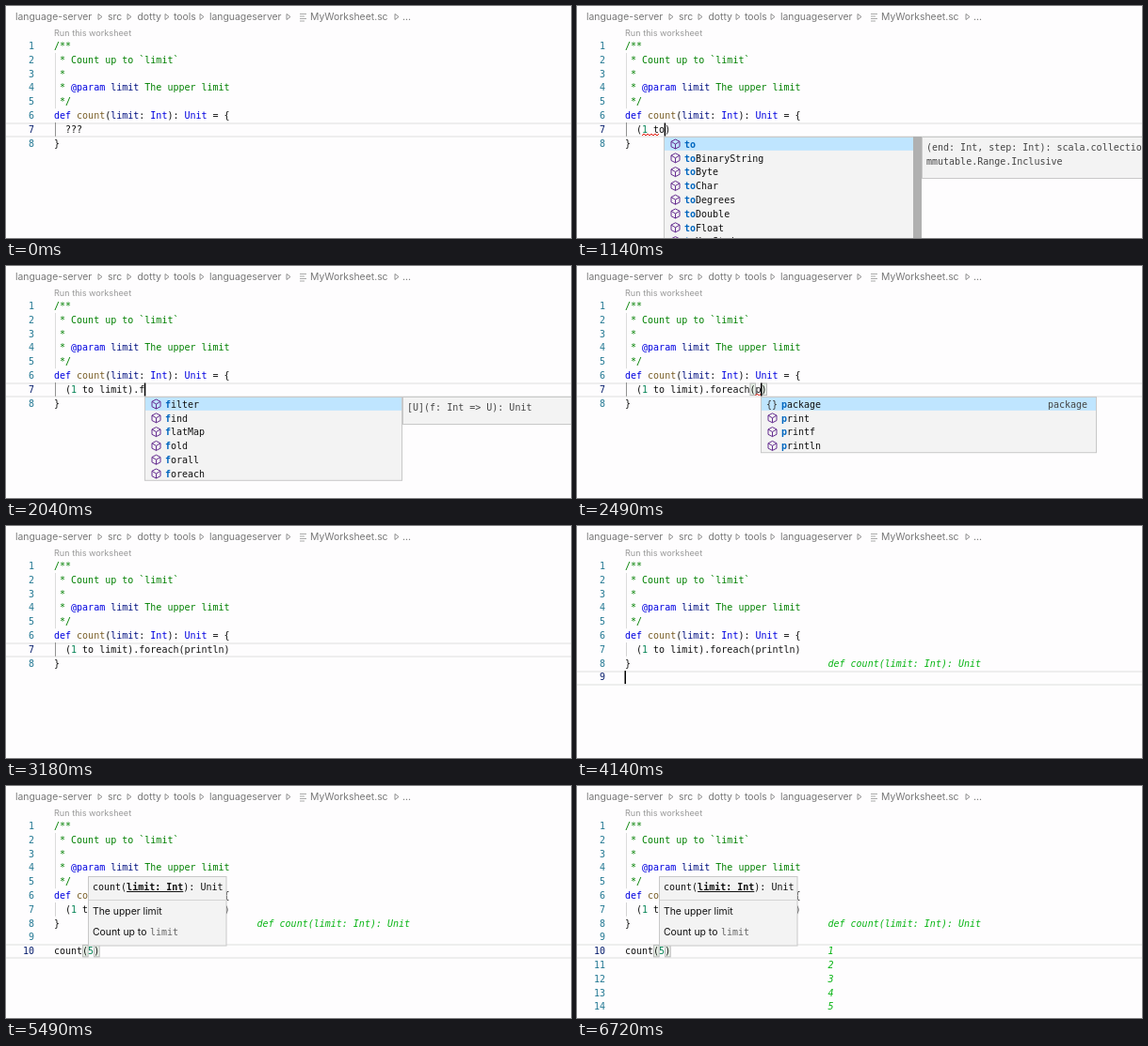
Write an HTML page with a canvas that moves like this. It is 600 px wide and 247 px high and loops after 6750 ms.

```html
<!DOCTYPE html>
<html lang="en">
<head>
<meta charset="utf-8">
<title>Worksheet</title>
<style>
html, body { margin: 0; width: 100%; height: 100%; overflow: hidden; background: #fefdfe; }
canvas { display: block; }
</style>
</head>
<body>
<canvas id="stage" width="600" height="247"></canvas>
<script>
const ctx = document.getElementById('stage').getContext('2d');
const LOOP = 6750, CHAR = 6.02, LEFT = 51, PITCH = 14.8;
const MONO = '10px "DejaVu Sans Mono", monospace';
const SANS = '10.4px Inter, sans-serif';
const BLUE = '#0000e0', NAVY = '#001080', GREEN = '#008000', BLACK = '#111', RED = '#e51400';
const RESULT = '#08b414';

const lineY = n => 42.2 + PITCH * (n - 1);
const colX = c => LEFT + CHAR * c;

// Completion lists: typed prefix, entries and an optional documentation panel
const toNames = ['to', 'toBinaryString', 'toByte', 'toChar', 'toDegrees', 'toDouble', 'toFloat', 'toHexString'];
const toDoc = ['(end: Int, step: Int): scala.collection', 'mmutable.Range.Inclusive'];
const members = ['by', 'canEqual', 'contains', 'copy', 'drop', 'end', 'equals', 'exists'];
const eachDoc = ['[U](f: Int => U): Unit'];
const lists = {
  t: { prefix: 't', names: toNames, doc: toDoc },
  to: { prefix: 'to', names: toNames, doc: toDoc },
  l: { prefix: 'l', names: ['limit'] },
  li: { prefix: 'li', names: ['limit'] },
  dot: { prefix: '', names: members, doc: ['(step: Int): scala.collection'] },
  f: { prefix: 'f', names: ['filter', 'find', 'flatMap', 'fold', 'forall', 'foreach'], doc: eachDoc },
  fo: { prefix: 'fo', names: ['foreach', 'forall', 'fold'], doc: eachDoc },
  p: { prefix: 'p', names: ['package', 'print', 'printf', 'println'], width: 357 },
  pr: { prefix: 'pr', names: ['print', 'printf', 'println'], width: 357 },
  c: { prefix: 'c', names: ['count'], doc: ['(limit: Int): Unit'], tall: true },
  co: { prefix: 'co', names: ['count'], doc: ['(limit: Int): Unit'], tall: true },
  cou: { prefix: 'cou', names: ['count'], doc: ['(limit: Int): Unit'], tall: true }
};

// [time, line, text with | as cursor, completion list, wavy columns, matched bracket columns]
const done = '  (1 to limit).foreach(println)';
const steps = [
  [0, 7, '  ???'],
  [510, 7, '  |'],
  [600, 7, '  (|)'],
  [720, 7, '  (1|)'],
  [840, 7, '  (1 |)'],
  [960, 7, '  (1 t|)', 't', [3, 5]],
  [1080, 7, '  (1 to|)', 'to', [3, 6]],
  [1200, 7, '  (1 to |)'],
  [1290, 7, '  (1 to l|)', 'l'],
  [1380, 7, '  (1 to li|)', 'li'],
  [1500, 7, '  (1 to limit|)'],
  [1650, 7, '  (1 to limit)|'],
  [1740, 7, '  (1 to limit).|'],
  [1890, 7, '  (1 to limit).|', 'dot'],
  [1980, 7, '  (1 to limit).f|', 'f'],
  [2100, 7, '  (1 to limit).fo|', 'fo'],
  [2220, 7, '  (1 to limit).foreach|'],
  [2340, 7, '  (1 to limit).foreach(|)', , , [22, 23]],
  [2430, 7, '  (1 to limit).foreach(p|)', 'p', [23, 24], [22, 24]],
  [2580, 7, '  (1 to limit).foreach(pr|)', 'pr', [23, 25], [22, 25]],
  [2850, 7, '  (1 to limit).foreach(println|)'],
  [3030, 7, done],
  [3900, 8, '}|'],
  [4080, 9, '|'],
  [4200, 10, '|'],
  [4330, 10, 'c|', 'c', [0, 1]],
  [4460, 10, 'co|', 'co', [0, 2]],
  [4590, 10, 'cou|', 'cou', [0, 3]],
  [4740, 10, 'count|'],
  [4860, 10, 'count(|)', , , [5, 6]],
  [5070, 10, 'count(5|)', , , [5, 7]],
  [5340, 10, 'count(5)', , , [5, 7]]
];

function text(str, x, y, color = BLACK, font = MONO) {
  ctx.font = font;
  ctx.fillStyle = color;
  ctx.fillText(str, x, y + 3.7);
}

function code(y, ...parts) {
  let col = 0;
  for (let i = 0; i < parts.length; i += 2) {
    text(parts[i + 1], colX(col), y, parts[i]);
    col += parts[i + 1].length;
  }
}

// Digits take the number colour
function plain(str, y) {
  const parts = str.split(/(\d+)/).flatMap((s, i) => [i % 2 ? '#098658' : BLACK, s]);
  code(y, ...parts);
}

function rect(x, y, w, h, color) {
  ctx.fillStyle = color;
  ctx.fillRect(x, y, w, h);
}

function frame(x, y, w, h, fill = '#f3f3f3', border = '#c8c8c8') {
  rect(x, y, w, h, border);
  rect(x + 1, y + 1, w - 2, h - 2, fill);
}

function path(points, color, width = 1) {
  ctx.beginPath();
  points.forEach(([x, y]) => ctx.lineTo(x, y));
  ctx.strokeStyle = color;
  ctx.lineWidth = width;
  ctx.stroke();
}

function wave(from, to, y) {
  const points = [];
  for (let x = colX(from), up = 0; x <= colX(to); x += 2, up ^= 1) points.push([x, y + 7 - 2 * up]);
  path(points, RED);
}

function cube(x, y) {
  path([[x, y - 5], [x + 4.5, y - 2.7], [x + 4.5, y + 2.7], [x, y + 5],
    [x - 4.5, y + 2.7], [x - 4.5, y - 2.7], [x, y - 5]], '#652d90');
  path([[x - 4.5, y - 2.7], [x, y], [x + 4.5, y - 2.7]], '#652d90');
  path([[x, y], [x, y + 5]], '#652d90');
}

function completion({ prefix, names, doc, tall, width = 274 }, x, y) {
  const height = names.length * PITCH + 1;
  frame(x, y, width, height);
  rect(x + 1, y + 1, width - 2, PITCH - 1, '#bfe5ff');
  names.forEach((name, i) => {
    const rowY = y + 8 + i * PITCH;
    if (name === 'package') {
      text('{}', x + 6, rowY, '#333');
      text(name, x + width - 52, rowY, '#444');
    } else cube(x + 12.5, rowY);
    text(name.slice(prefix.length), x + 22 + prefix.length * CHAR, rowY);
    text(prefix, x + 22, rowY, '#0066bf', 'bold ' + MONO);
  });
  if (names.length > 7) rect(x + width - 9, y, 9, height, '#b0b0b0');
  if (!doc) return;
  const px = x + width;
  frame(px, y, 610 - px, tall ? 80 : 15 + doc.length * 15);
  doc.forEach((line, i) => text(line, px + 5, y + 11.5 + i * 15, '#444'));
  if (tall) {
    rect(px, y + 24, 260, 1, '#e8e8e8');
    text('Count up to', px + 5, y + 39.5, BLACK, SANS);
    text('limit', px + 67, y + 39.5, '#666');
    text('Parameters', px + 5, y + 65, BLACK, 'bold ' + SANS);
  }
}

function signature() {
  frame(87, 96, 147.5, 74.5);
  text('count(', 92, 107);
  text('limit: Int', 92 + 6 * CHAR, 107, BLACK, 'bold ' + MONO);
  rect(92 + 6 * CHAR, 112, 10 * CHAR, 1, BLACK);
  text('): Unit', 92 + 16 * CHAR, 107);
  rect(88, 121, 145, 1, '#d4d4d4');
  text('The upper limit', 92, 133, BLACK, SANS);
  text('Count up to', 92, 155, BLACK, SANS);
  text('limit', 153, 155, '#666');
}

function breadcrumb() {
  const grey = '#777';
  [['language-server', 10], ['src', 108], ['dotty', 139.5], ['tools', 178],
    ['languageserver', 216], ['MyWorksheet.sc', 323], ['…', 421]]
    .forEach(([label, x]) => text(label, x, 11.5, grey, SANS));
  [98, 129, 169, 206, 298, 413].forEach(x =>
    path([[x, 8.5], [x + 4, 11.5], [x, 14.5], [x, 8.5]], grey, 0.8));
  [7, 5, 7, 5].forEach((w, i) => rect(312, 8 + i * 2.5, w, 1, '#aaa'));
  text('Run this worksheet', LEFT, 28, '#999', '9.1px Inter, sans-serif');
}

function draw(t) {
  const [, line, source, list, wavy, match] = steps.findLast(s => s[0] <= t);
  const cursor = source.indexOf('|'), typed = source.replace('|', '');
  const y = lineY(line), printed = t >= 5520;
  rect(0, 0, 600, 247, '#fefdfe');
  breadcrumb();

  for (const dy of [-7, 7]) rect(0, Math.round(y) + dy, 600, 2, '#eeeeee');
  rect(52, lineY(2) - 7, 1, 4 * PITCH, '#dcdcdc');
  rect(52, lineY(7) - 7, 1, PITCH, line === 7 ? '#939393' : '#d3d3d3');

  ctx.textAlign = 'right';
  const last = printed ? 14 : Math.max(8, line);
  for (let n = 1; n <= last; n++) text(n, 30, lineY(n), n === line ? '#0b216f' : '#237893');
  ctx.textAlign = 'left';

  code(lineY(1), GREEN, '/**');
  code(lineY(2), GREEN, ' * Count up to `limit`');
  code(lineY(3), GREEN, ' *');
  code(lineY(4), GREEN, ' * ', BLUE, '@param', NAVY, ' limit', GREEN, ' The upper limit');
  code(lineY(5), GREEN, ' */');
  code(lineY(6), BLUE, 'def ', '#795e26', 'count', BLACK, '(', NAVY, 'limit', BLACK, ': ',
    BLUE, 'Int', BLACK, '): ', BLUE, 'Unit', BLACK, ' = {');
  if (match) match.forEach(c => frame(colX(c), y - 6.5, CHAR + 0.5, 13.5, '#e8f2e8', '#b9b9b9'));
  plain(line === 7 ? typed : done, lineY(7));
  text('}', LEFT, lineY(8));
  if (line === 10) plain(typed, y);

  if (wavy) wave(...wavy, y);
  if (t >= 1740 && t < 1980) wave(0, 1, lineY(8));

  const italic = 'italic ' + MONO;
  if (t >= 3420) text('def count(limit: Int): Unit', 266.5, lineY(8), RESULT, italic);
  if (printed) for (let i = 1; i <= 5; i++) text(i, 266.5, lineY(9 + i), RESULT, italic);

  if (cursor >= 0) rect(colX(cursor) - 0.5, y - 6.5, 1.5, 14, '#000');
  if (list) completion(lists[list], Math.round(colX(cursor) - 0.8), Math.round(y + 8));
  if (t >= 4860) signature();
}

function tick() {
  draw(performance.now() % LOOP);
  requestAnimationFrame(tick);
}
tick();
</script>
</body>
</html>
```
